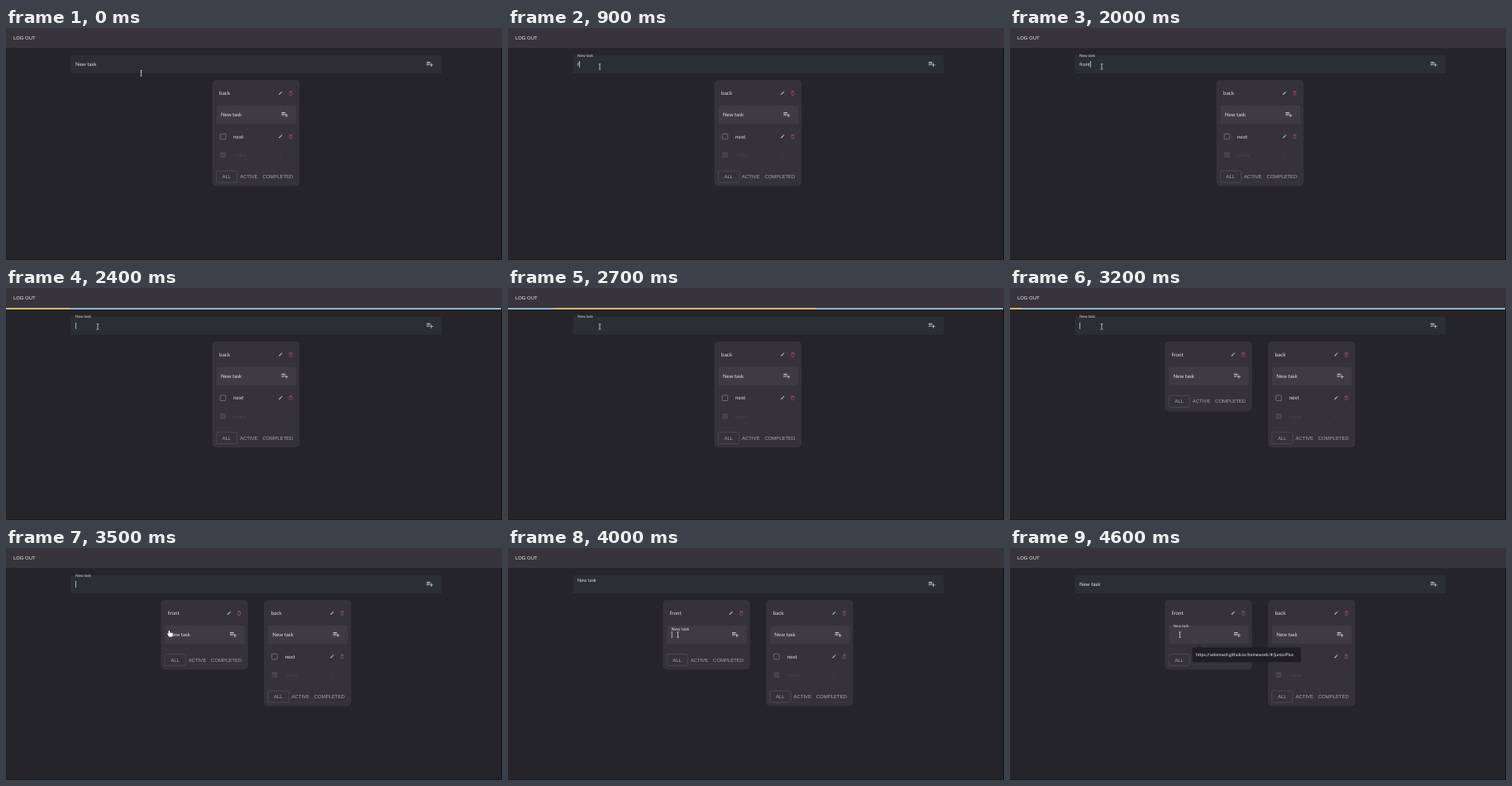
An HTML page with a canvas that plays this animation: 600x281 px, repeating every 5 s.

```html
<!DOCTYPE html>
<html lang="en">
<head>
<meta charset="utf-8">
<title>Task lists</title>
<style>
  html, body { margin: 0; width: 100%; height: 100%; overflow: hidden; background: #252428; }
  canvas { display: block; width: 100%; height: 100%; }
</style>
</head>
<body>
<canvas id="stage"></canvas>
<script>
const W = 600, H = 281, LOOP = 5000, STEP = 100;
const SANS = 'Lato, sans-serif';
const BUTTON = '"Liberation Sans", Arial, sans-serif';
const COLOR = {
  page: '#252428', header: '#37353b', card: '#353339', field: '#3e3c42',
  input: '#2e2d32', inputUsed: '#2b2f32', text: '#e2e1e4', dim: '#a5a3a9',
  faint: '#48464c', line: '#57555b', icon: '#c4c3c7', red: '#a85767',
  track: '#a3c6e3', bar: '#dcbc62'
};

const canvas = document.getElementById('stage');
const ctx = canvas.getContext('2d');
const addIcon = new Path2D('M14 10H3v2h11v-2zm0-4H3v2h11V6zm4 8v-4h-2v4h-4v2h4v4h2v-4h4v-2h-4zM3 16h7v-2H3v2z');

const clamp = v => Math.max(0, Math.min(1, v));
const mix = (a, b, p) => a + (b - a) * p;

// CSS-style cubic timing curve
function bezier(x1, y1, x2, y2) {
  const at = (a, b, s) => 3 * (1 - s) ** 2 * s * a + 3 * (1 - s) * s * s * b + s ** 3;
  return x => {
    if (x <= 0 || x >= 1) return clamp(x);
    let lo = 0, hi = 1;
    for (let i = 0; i < 24; i++) {
      const mid = (lo + hi) / 2;
      if (at(x1, x2, mid) < x) lo = mid; else hi = mid;
    }
    return at(y1, y2, lo);
  };
}
const labelEase = bezier(0, 0, 0.2, 1);
const barEase = bezier(0.65, 0.815, 0.735, 0.395);
const moveEase = bezier(0.4, 0, 0.3, 1);

function text(str, x, y, size, color = COLOR.text, family = SANS, weight = 400) {
  ctx.font = `${weight} ${size}px ${family}`;
  ctx.fillStyle = color;
  ctx.fillText(str, x, y);
  return ctx.measureText(str).width;
}

function box(x, y, w, h, color, r = 0) {
  ctx.fillStyle = color;
  ctx.beginPath();
  ctx.roundRect(x, y, w, h, r);
  ctx.fill();
}

function frame(x, y, w, h, color, r, width) {
  ctx.strokeStyle = color;
  ctx.lineWidth = width;
  ctx.beginPath();
  ctx.roundRect(x, y, w, h, r);
  ctx.stroke();
}

function line(points, color, width) {
  ctx.strokeStyle = color;
  ctx.lineWidth = width;
  ctx.beginPath();
  points.forEach(([x, y], i) => i ? ctx.lineTo(x, y) : ctx.moveTo(x, y));
  ctx.stroke();
}

function playlistAdd(x, y) {
  ctx.save();
  ctx.translate(x - 1.3, y - 5.4);
  ctx.scale(0.42, 0.42);
  ctx.fillStyle = COLOR.icon;
  ctx.fill(addIcon);
  ctx.restore();
}

function pencil(x, y, color) {
  line([[x - 1.6, y + 1.6], [x + 1.1, y - 1.1]], color, 1.1);
  line([[x + 1.4, y - 1.4], [x + 2, y - 2]], color, 1.1);
}

function bin(x, y, color) {
  line([[x - 2, y - 2], [x + 2, y - 2]], color, 0.6);
  line([[x - 0.7, y - 2.4], [x + 0.7, y - 2.4]], color, 0.5);
  frame(x - 1.4, y - 1.5, 2.8, 3.8, color, 0.4, 0.6);
}

function caret(x, y) {
  box(x, y - 4, 0.7, 8, COLOR.text);
}

// Label slides from the middle of its field onto the top edge
function floatLabel(x, midY, p) {
  text('New task', x, mix(midY + 2.1, midY - 9.4, p), mix(6.2, 4.65, p));
}

function task(x, y, name, done) {
  const color = done ? COLOR.faint : '#7b797f';
  if (done) {
    box(x + 9.5, y - 3.4, 6.8, 6.8, color, 0.8);
    line([[x + 11, y], [x + 12.4, y + 1.4], [x + 15, y - 1.5]], COLOR.card, 0.8);
  } else {
    frame(x + 9.6, y - 3.3, 6.6, 6.6, color, 0.8, 0.8);
  }
  text(name, x + 25.5, y + 2.1, 6.3, done ? COLOR.faint : COLOR.text);
  pencil(x + 82.3, y, done ? '#413f45' : COLOR.icon);
  bin(x + 94.8, y, done ? '#38363c' : COLOR.red);
}

function filters(x, y) {
  frame(x + 4.8, y - 7, 25.2, 14, COLOR.line, 1.6, 0.6);
  text('ALL', x + 12, y + 2.1, 5.95, COLOR.dim, BUTTON);
  text('ACTIVE', x + 33.5, y + 2.1, 5.95, COLOR.dim, BUTTON);
  text('COMPLETED', x + 60.8, y + 2.1, 5.95, COLOR.dim, BUTTON);
}

function card(x, dy, title, tasks, focus = 0) {
  const y = 63 + dy;
  box(x, y, 105.5, tasks.length ? 128.5 : 84.3, COLOR.card, 5);
  text(title, x + 8.5, y + 18.1, 6.4);
  pencil(x + 82.3, y + 16, COLOR.icon);
  bin(x + 94.8, y + 16, COLOR.red);
  box(x + 5, y + 31, 96.5, 22, COLOR.field, [2, 2, 0, 0]);
  floatLabel(x + 10.3, y + 42, focus);
  playlistAdd(x + 83.7, y + 42);
  tasks.forEach((t, i) => task(x, y + 68.5 + i * 22.2, t.name, t.done));
  filters(x, y + (tasks.length ? 117 : 72.6));
}

const typed = t =>
  t < 900 || t >= 2400 ? '' :
  t < 1000 ? 'f' : t < 1100 ? 'fr' : t < 1200 ? 'fron' : 'front';

const inputCaretOn = t =>
  (t >= 700 && t < 1600) || (t >= 2000 && t < 2500) || (t >= 3000 && t < 3600);

function input(t, dy) {
  const p = t < 3900 ? labelEase(clamp((t - 600) / 200))
                     : 1 - labelEase(clamp((t - 3950) / 200));
  box(78.5, 33 + dy, 448.5, 22, t < 700 ? COLOR.input : COLOR.inputUsed, [2, 2, 0, 0]);
  floatLabel(84, 44 + dy, p);
  const width = text(typed(t), 84, 46.1 + dy, 6);
  if (inputCaretOn(t)) caret(84.1 + width, 44 + dy);
  playlistAdd(508.8, 44 + dy);
}

function progress(t) {
  const start = t < 3200 ? 2330 : 3187;
  const p = barEase(clamp((t - start) / 1260));
  const left = Math.max(0, W * (-0.35 + 1.35 * p));
  const right = Math.min(W, W * 1.9 * p);
  box(0, 24.2, W, 1.7, COLOR.track);
  if (right > left) box(left, 24.2, right - left, 1.7, COLOR.bar);
}

function tooltip() {
  ctx.fillStyle = '#1f1e22';
  ctx.beginPath();
  ctx.moveTo(226, 121);
  ctx.lineTo(229, 118);
  ctx.lineTo(232, 121);
  ctx.fill();
  box(220.5, 120.5, 131.5, 17.8, '#1f1e22', 1);
  text('https://velomasti.github.io/homework/#/juniorPlus', 225, 131, 5.27, '#f0eff2');
}

function beam(x, y) {
  const c = '#d8d8da';
  line([[x, y - 3], [x, y + 3]], c, 0.8);
  line([[x - 1.5, y - 3.2], [x + 1.5, y - 3.2]], c, 0.6);
  line([[x - 1.5, y + 3.2], [x + 1.5, y + 3.2]], c, 0.6);
}

function hand(x, y) {
  box(x - 1.9, y - 4, 1.5, 5, '#fff', 0.7);
  box(x - 1.9, y - 1.2, 4.8, 4.6, '#fff', 1.2);
  line([[x - 3, y - 0.4], [x - 1.2, y + 2.2]], '#fff', 1.2);
}

function pointer(t) {
  if (t < 3300) {
    const p = moveEase(clamp(t / 600));
    beam(mix(163.5, 111, p), mix(54.8, 46.8, p));
  } else if (t < 3500) {
    const p = t < 3400 ? 0.2 : 0.7;
    beam(mix(111, 198.5, p), mix(46.8, 104, p));
  } else if (t < 3600) {
    hand(198.5, 104);
  } else {
    beam(t < 3800 ? 203.5 : 205.5, t < 3800 ? 104 : 105);
  }
}

const backTasks = [{ name: 'next' }, { name: 'redux', done: true }];

function draw(t) {
  const loading = t >= 2400 && t < 3500;
  const dy = loading ? 1.7 : 0;
  box(0, 0, W, H, COLOR.page);
  box(0, 0, W, 24.3, COLOR.header);
  text('LOG OUT', 9, 13.9, 5.9, '#f2f1f4', BUTTON);
  if (loading) progress(t);
  input(t, dy);

  if (t < 3200) {
    card(249.6, dy, 'back', backTasks);
  } else {
    card(187.3, dy, 'front', [], labelEase(clamp((t - 3950) / 200)));
    card(312, dy, 'back', backTasks);
  }
  if (t >= 4000 && t < 4600) caret(197.8, 105);
  if (t >= 4100) tooltip();
  box(599, 24, 1, H - 24, '#121214');
  box(0, 280.3, W, 0.7, '#18171a');
  pointer(t);
}

function resize() {
  const ratio = window.devicePixelRatio || 1;
  canvas.width = Math.round(innerWidth * ratio);
  canvas.height = Math.round(innerHeight * ratio);
}

function tick() {
  const now = performance.now() % LOOP;
  ctx.setTransform(canvas.width / W, 0, 0, canvas.height / H, 0, 0);
  ctx.textRendering = 'geometricPrecision';
  draw(Math.floor(now / STEP) * STEP);
  requestAnimationFrame(tick);
}

addEventListener('resize', resize);
resize();
tick();
</script>
</body>
</html>
```
